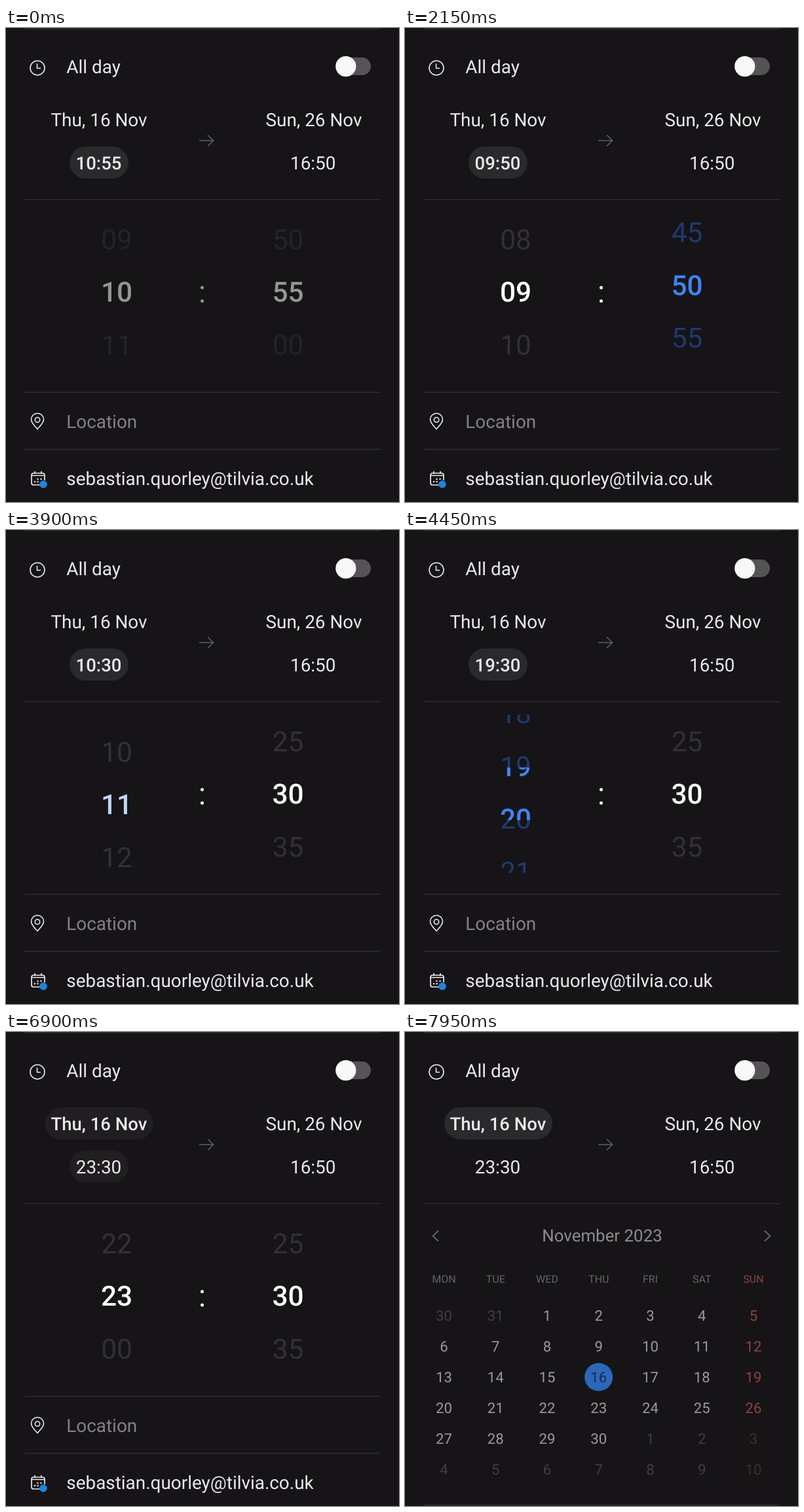
These frames come from a looping animation (600 by 724 pixels, 8000 ms). An HTML page with a canvas:

```html
<!DOCTYPE html>
<html lang="en">
<head>
<meta charset="utf-8">
<title>Event time picker</title>
<style>
  html, body { margin: 0; height: 100%; overflow: hidden; background: #161417; }
  canvas { display: block; }
</style>
</head>
<body>
<canvas id="stage" width="600" height="724"></canvas>
<script>
const ctx = document.getElementById('stage').getContext('2d');
const LOOP = 8000, STEP = 50, PITCH = 80.5, CENTER = 403;
const BG = '#161417', TEXT = '#ebe9ec', RULE = '#302e31';
const REGULAR = 27.9, MEDIUM = 27.5;
ctx.textRendering = 'geometricPrecision';

const ramp = (t, from, to) => Math.min(1, Math.max(0, (t - from) / (to - from)));
const smooth = u => u * u * (3 - 2 * u);
const easeOut = u => 1 - (1 - u) ** 2;
const pad = n => String(n).padStart(2, '0');
const mix = (a, b, k) => `rgb(${a.map((v, i) => Math.round(v + (b[i] - v) * k))})`;

// Wheel positions, measured in rows
function hourPos(t) {
  if (t < 3800) return 10 - smooth(ramp(t, 700, 1050));
  return 9 + 1.8 * ramp(t, 3800, 3900) + 12.2 * easeOut(ramp(t, 3900, 5080));
}
const minutePos = t =>
  11 - 1.65 * smooth(ramp(t, 1500, 2750)) - 3.35 * easeOut(ramp(t, 2750, 3450));

const hourTint = t => t < 3000
  ? ramp(t, 700, 900) - ramp(t, 1050, 1350)
  : ramp(t, 3800, 4100) - ramp(t, 5250, 5550);
const minuteTint = t => ramp(t, 1500, 1800) - ramp(t, 3500, 3800);

const hourName = i => pad(((i % 24) + 24) % 24);
const minuteName = i => pad((((i % 12) + 12) % 12) * 5);

function text(str, x, y, size, color, align = 'left', weight = 400) {
  ctx.font = `${weight} ${size}px Roboto, sans-serif`;
  ctx.textAlign = align;
  ctx.fillStyle = color;
  ctx.fillText(str, x, y);
}

const label = (str, x, y, active) =>
  text(str, x, y, active ? MEDIUM : REGULAR, TEXT, 'center', active ? 500 : 400);

function stroke(path, color, width) {
  ctx.strokeStyle = color;
  ctx.lineWidth = width;
  ctx.stroke(new Path2D(path));
}

function disc(x, y, r, color) {
  ctx.fillStyle = color;
  ctx.beginPath();
  ctx.arc(x, y, r, 0, 7);
  ctx.fill();
}

function pill(x, y, w, h, color) {
  ctx.fillStyle = color;
  ctx.beginPath();
  ctx.roundRect(x, y, w, h, h / 2);
  ctx.fill();
}

const rule = y => stroke(`M28 ${y}H572`, RULE, 1.5);

function clipped(top, bottom, draw) {
  ctx.save();
  ctx.beginPath();
  ctx.rect(0, top, 600, bottom - top);
  ctx.clip();
  draw();
  ctx.restore();
}

function withAlpha(alpha, draw) {
  if (alpha <= 0) return;
  ctx.save();
  ctx.globalAlpha = alpha;
  draw();
  ctx.restore();
}

function wheel(x, pos, name, tint) {
  const rows = (color, weight) => {
    for (let i = Math.floor(pos) - 2; i <= pos + 2; i++)
      text(name(i), x, CENTER + 15 + (i - pos) * PITCH, 42.4, color, 'center', weight);
  };
  const dim = mix([50, 48, 51], [30, 58, 108], tint * tint);
  const lit = mix([255, 255, 255], [62, 132, 242], tint);
  const top = CENTER - PITCH / 2, bottom = CENTER + PITCH / 2;
  clipped(top - PITCH, top, () => rows(dim, 400));
  clipped(bottom, bottom + PITCH, () => rows(dim, 400));
  clipped(top, bottom, () => rows(lit, 500));
}

function picker(t) {
  wheel(169, hourPos(t), hourName, hourTint(t));
  wheel(430.5, minutePos(t), minuteName, minuteTint(t));
  disc(299.5, 396.5, 2.5, '#fff');
  disc(299.5, 417, 2.5, '#fff');
}

function header(t) {
  const swap = ramp(t, 6800, 7000), dateOn = swap >= 0.5;
  stroke('M28 1H572', RULE, 1.5);
  stroke('M59 61a11 11 0 1 1-22 0a11 11 0 1 1 22 0M47.5 54.5V61.5H53', TEXT, 1.6);
  text('All day', 92.3, 69, REGULAR, TEXT);
  pill(508, 45, 49, 27, '#555356');
  disc(518.8, 58.6, 15.6, '#faf7fb');

  withAlpha(1 - swap, () => pill(97, 181, 90, 49, '#2a292b'));
  withAlpha(swap, () => pill(60, 115, 165, 49, '#2a292b'));
  // The label trails the wheel by one step
  const seen = t - STEP;
  const time = hourName(Math.round(hourPos(seen))) + ':' + minuteName(Math.round(minutePos(seen)));
  label('Thu, 16 Nov', 142, 150, dateOn);
  label(time, 141.5, 216, !dateOn);
  label('Sun, 26 Nov', 470, 150);
  label('16:50', 468.7, 216);
  stroke('M295 172H316M308 163.5L316.5 172L308 180.5', '#5f5d60', 1.7);
  rule(262);
}

function details() {
  rule(556.5);
  stroke('M48 612.5C43 607 38.5 603 38.5 598a9.5 9.5 0 0 1 19 0C57.5 603 53 607 48 612.5Z' +
         'M51.7 598.5a3.7 3.7 0 1 1-7.4 0a3.7 3.7 0 1 1 7.4 0', TEXT, 1.6);
  text('Location', 92.3, 611, REGULAR, '#838184');
  rule(643.5);
  stroke('M52 698H42Q39 698 39 695V683Q39 680 42 680H56Q59 680 59 683V691' +
         'M44 677V681M54 677V681M39 683.5H59', TEXT, 1.7);
  for (const [x, y] of [[44, 693], [48.5, 693], [48.5, 689], [53.5, 689]]) disc(x, y, 1.2, TEXT);
  disc(57, 697, 5.8, '#1b86dd');
  text('sebastian.quorley@tilvia.co.uk', 92.3, 698, REGULAR, TEXT);
}

function calendar() {
  const red = '#bc5a50', muted = '#525054';
  stroke('M51 303.5L42.5 311.5L51 319.5M549 303.5L557.5 311.5L549 319.5', '#858387', 1.9);
  text('November 2023', 301, 320, 25.9, '#c0bec1', 'center');
  const colX = c => 59.5 + 78.75 * c;
  ['MON', 'TUE', 'WED', 'THU', 'FRI', 'SAT', 'SUN'].forEach((day, c) =>
    text(day, colX(c), 382.5, 16, c === 6 ? red : '#868486', 'center'));
  disc(295.7, 527, 21.5, '#358bff');
  for (let i = 0; i < 42; i++) {
    const offset = i - 1, c = i % 7;
    const inMonth = offset > 0 && offset <= 30;
    const day = offset < 1 ? offset + 31 : inMonth ? offset : offset - 30;
    const color = !inMonth ? (c === 6 ? '#4b3a3c' : muted)
      : day === 16 ? BG : c === 6 ? red : '#d4d2d5';
    text(day, colX(c), 441 + 47 * Math.floor(i / 7), 22.2, color, 'center');
  }
}

function draw(t) {
  ctx.fillStyle = BG;
  ctx.fillRect(0, 0, 600, 724);
  header(t);
  const fade = Math.min(0.55 + t / 220, 1) * (1 - ramp(t, 6950, 7400));
  withAlpha(fade, () => picker(t));

  const slide = 166 * smooth(ramp(t, 7469, 7769));
  withAlpha(ramp(t, 7700, 8057), () => clipped(263, 556 + slide, calendar));
  ctx.save();
  ctx.translate(0, slide);
  details();
  ctx.restore();
}

function frame() {
  draw(Math.floor(performance.now() % LOOP / STEP) * STEP);
  requestAnimationFrame(frame);
}
frame();
</script>
</body>
</html>
```
